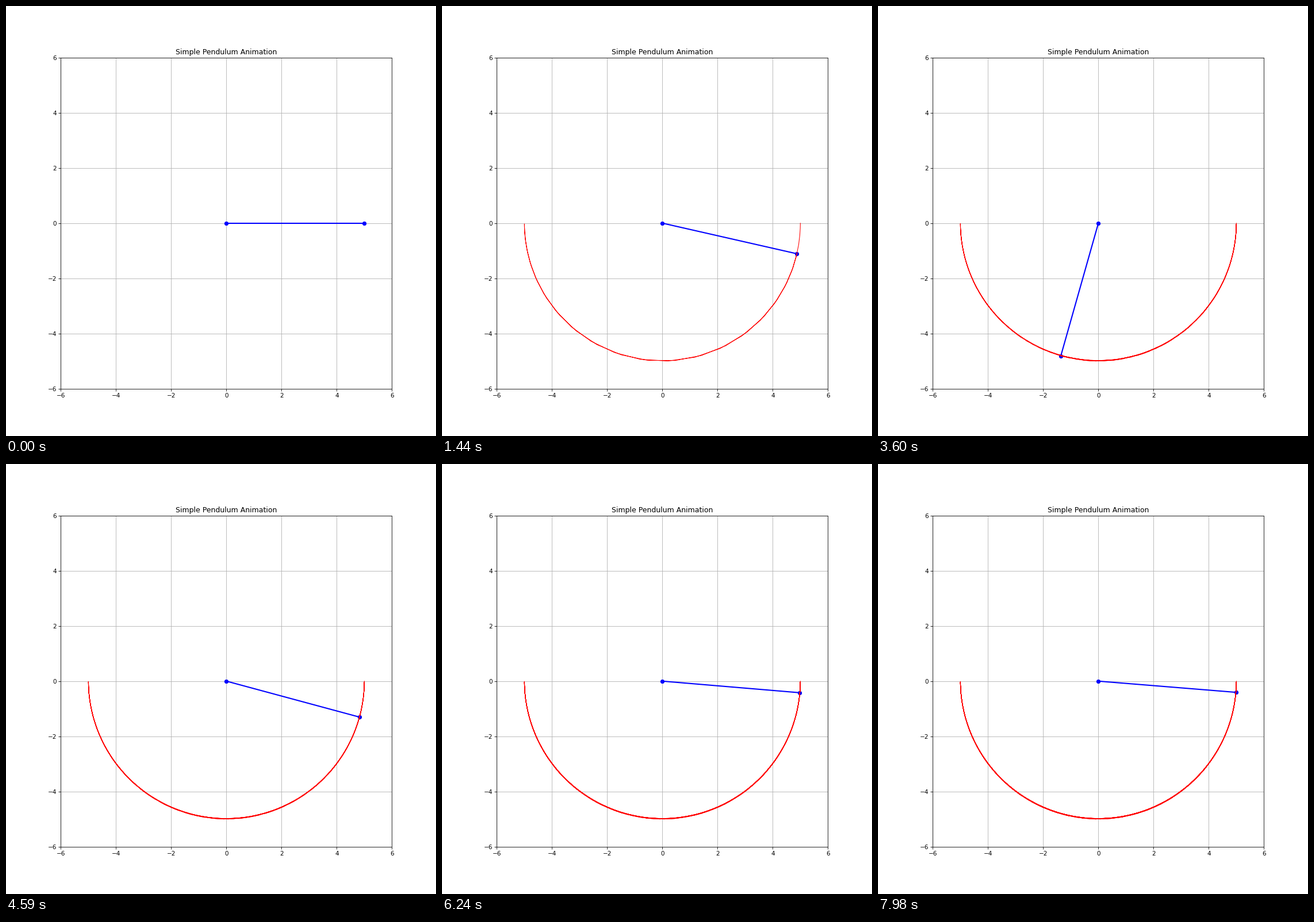
A matplotlib script for the animation above (8000 ms loop, 748 by 748 pixels).

```python
import numpy as np
import matplotlib.pyplot as plt
from matplotlib.animation import FuncAnimation

SIZE, DPI = 748, 74.8
LOOP_MS, FRAMES = 8000, 267
G, LENGTH = 9.8, 5.0
T_END, SAMPLES = 30.0, 300
RTOL, ATOL = 1e-3, 1e-6

# Dormand-Prince 5(4) coefficients with quartic dense output
A = [
    [],
    [1 / 5],
    [3 / 40, 9 / 40],
    [44 / 45, -56 / 15, 32 / 9],
    [19372 / 6561, -25360 / 2187, 64448 / 6561, -212 / 729],
    [9017 / 3168, -355 / 33, 46732 / 5247, 49 / 176, -5103 / 18656],
    [35 / 384, 0, 500 / 1113, 125 / 192, -2187 / 6784, 11 / 84],
]
E = np.array([-71 / 57600, 0, 71 / 16695, -71 / 1920,
              17253 / 339200, -22 / 525, 1 / 40])
P = np.array([
    [1, -8048581381 / 2820520608, 8663915743 / 2820520608,
     -12715105075 / 11282082432],
    [0, 0, 0, 0],
    [0, 131558114200 / 32700410799, -68118460800 / 10900136933,
     87487479700 / 32700410799],
    [0, -1754552775 / 470086768, 14199869525 / 1410260304,
     -10690763975 / 1880347072],
    [0, 127303824393 / 49829197408, -318862633887 / 49829197408,
     701980252875 / 199316789632],
    [0, -282668133 / 205662961, 2019193451 / 616988883,
     -1453857185 / 822651844],
    [0, 40617522 / 29380423, -110615467 / 29380423, 69997945 / 29380423],
])


def swing(y):
    theta, omega = y
    return np.array([omega, -G / LENGTH * np.sin(theta)])


def rms(v):
    return np.sqrt(np.mean(v ** 2))


def first_step(y):
    scale = ATOL + np.abs(y) * RTOL
    f = swing(y)
    d0, d1 = rms(y / scale), rms(f / scale)
    h0 = 0.01 * d0 / d1
    d2 = rms((swing(y + h0 * f) - f) / scale) / h0
    return min(100 * h0, (0.01 / max(d1, d2)) ** 0.2)


def solve(y, times):
    """Adaptive integration, interpolated at the given times."""
    t, h = 0.0, first_step(y)
    out = np.zeros((len(times), len(y)))
    out[0] = y
    rejected = False
    while t < times[-1]:
        h = min(h, times[-1] - t)
        k = np.zeros((7, len(y)))
        for i, row in enumerate(A):
            y_new = y + h * (np.array(row) @ k[:i]) if row else y
            k[i] = swing(y_new)
        scale = ATOL + np.maximum(np.abs(y), np.abs(y_new)) * RTOL
        err = rms(h * (E @ k) / scale)
        factor = 0.9 * max(err, 1e-12) ** -0.2
        if err >= 1:
            h *= max(0.2, factor)
            rejected = True
            continue
        t_new = times[-1] if times[-1] - t <= h else t + h
        inside = (times > t) & (times <= t_new)
        x = (times[inside] - t) / h
        powers = x[:, None] ** np.arange(1, 5)
        out[inside] = y + h * (powers @ (P.T @ k))
        t, y = t_new, y_new
        h *= min(1 if rejected else 10, factor)
        rejected = False
    return out


theta = solve(np.array([np.pi / 2, 0.0]), np.linspace(0, T_END, SAMPLES))[:, 0]
xs, ys = LENGTH * np.sin(theta), -LENGTH * np.cos(theta)

fig, ax = plt.subplots(figsize=(SIZE / DPI, SIZE / DPI), dpi=DPI)
ax.set_xlim(-6, 6)
ax.set_ylim(-6, 6)
ax.set_aspect("equal")
ax.grid(True)
ax.set_title("Simple Pendulum Animation")
rod, = ax.plot([], [], "o-", color="blue", lw=2)
trail, = ax.plot([], [], "-", color="red", lw=1)


def update(i):
    rod.set_data([0, xs[i]], [0, ys[i]])
    trail.set_data(xs[:i + 1], ys[:i + 1])
    return rod, trail


ani = FuncAnimation(fig, update, frames=FRAMES, interval=LOOP_MS / FRAMES,
                    init_func=lambda: update(0), repeat=True, repeat_delay=0)
plt.show()
```
